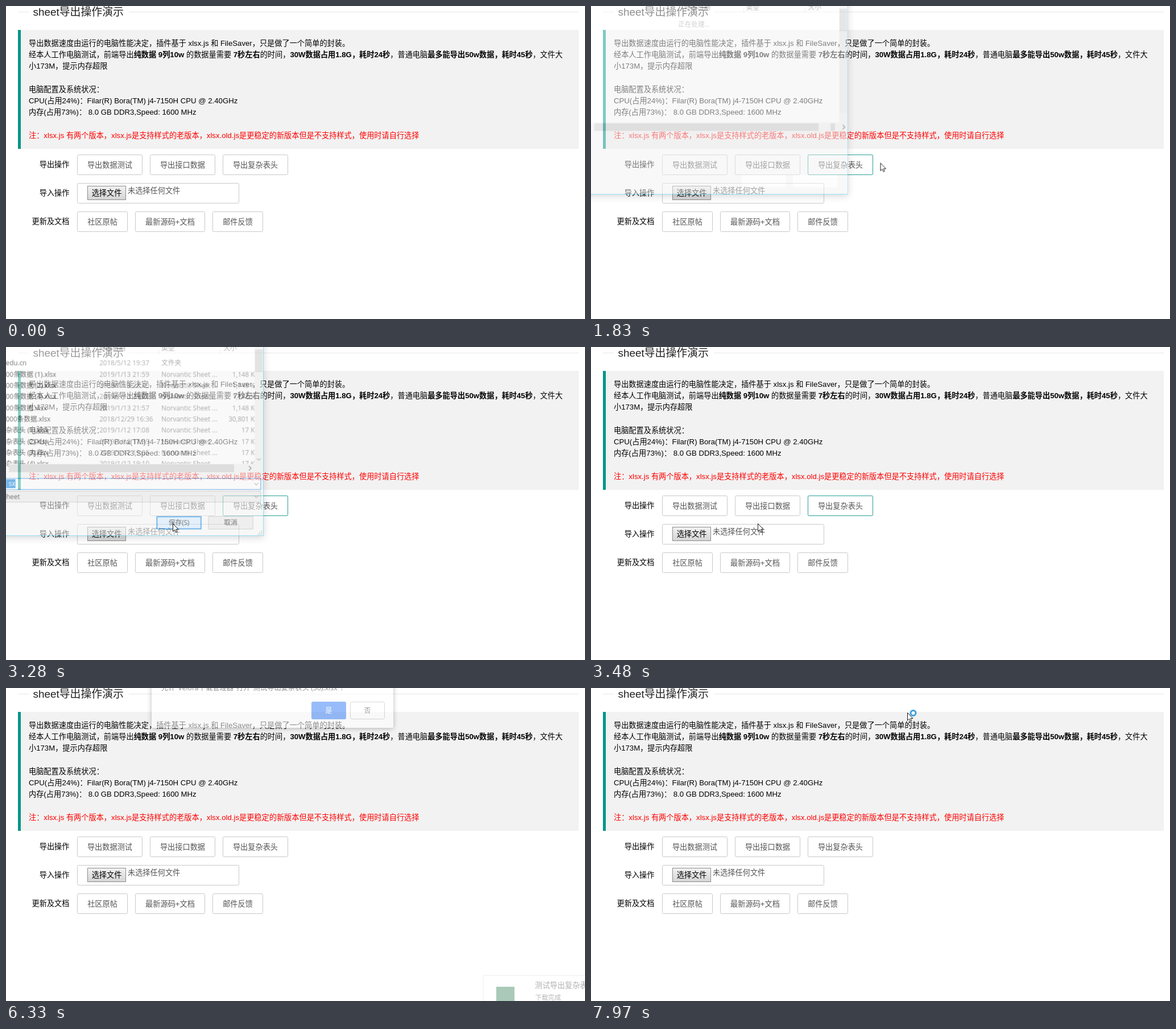
Animation, 1018 px wide and 550 px high, one loop 8000 ms. Source, as an HTML page:

```html
<!DOCTYPE html>
<html lang="zh-CN">
<head>
<meta charset="utf-8">
<title>导出操作演示</title>
<style>
html, body { margin: 0; width: 100%; height: 100%; overflow: hidden; background: #fff; }
svg { display: block; width: 1018px; height: 550px; }
text { white-space: pre; }
.page { font: 13.2px "Liberation Sans", "Noto Sans CJK SC", "Noto Sans CJK", sans-serif; }
.win { font: 12px "Open Sans", "Noto Sans CJK SC", "Noto Sans CJK", sans-serif; }
.b { font-weight: bold; }
.end { text-anchor: end; }
.mid { text-anchor: middle; }
#save { filter: drop-shadow(0 3px 7px rgba(0, 0, 0, .3)); }
#toast { filter: drop-shadow(0 0 2px rgba(0, 0, 0, .12)); }
#ask { filter: drop-shadow(0 1px 4px rgba(0, 0, 0, .5)); }
</style>
</head>
<body>
<svg id="stage" viewBox="0 0 1018 550" xmlns="http://www.w3.org/2000/svg"></svg>
<script>
const LOOP = 8000, TICK = 109;
const stage = document.getElementById('stage');

const text = (x, y, s, fill = '#000', cls = '', more = '') =>
  `<text x="${x}" y="${y}" fill="${fill}" class="${cls}" ${more}>${s}</text>`;
const bold = s => `<tspan class="b">${s}</tspan>`;
const box = (x, y, w, h, fill, stroke = 'none', more = '') =>
  `<rect x="${x}" y="${y}" width="${w}" height="${h}" fill="${fill}" stroke="${stroke}" ${more}/>`;
const line = (d, stroke, more = '') => `<path d="${d}" fill="none" stroke="${stroke}" ${more}/>`;

// A form row: right-aligned label, then buttons as wide as their text.
function formRow(label, labels, i) {
  const y = 261 + i * 50;
  let x = 125;
  const buttons = labels.map(s => {
    const w = Math.round([...s].reduce((sum, c) => sum + (c < '\x80' ? 7.7 : 13.2), 35.7));
    const left = x;
    x += w + 13;
    return box(left + .5, y + .5, w - 1, 35, '#fff', '#c9c9c9', 'rx="2"') +
      text(left + w / 2, y + 23, s, '#555', 'mid');
  });
  return text(111.5, y + 22.3, label, '#000', 'end') + buttons.join('');
}

function page() {
  const notes = [
    '导出数据速度由运行的电脑性能决定，插件基于 xlsx.js 和 FileSaver，只是做了一个简单的封装。',
    `经本人工作电脑测试，前端导出${bold('纯数据 9列10w')} 的数据量需要 ${bold('7秒左右')}的时间，${bold('30W数据占用1.8G，耗时24秒')}，普通电脑${bold('最多能导出50w数据，耗时45秒')}，文件大`,
    '小173M，提示内存超限',
    '',
    '电脑配置及系统状况：',
    'CPU(占用24%)：Filar(R) Bora(TM) j4-7150H CPU @ 2.40GHz',
    '内存(占用73%)： 8.0 GB DDR3,Speed: 1600 MHz',
    '',
    '注：xlsx.js 有两个版本，xlsx.js是支持样式的老版本，xlsx.old.js是更稳定的新版本但是不支持样式，使用时请自行选择'
  ];
  const form = [
    ['导出操作', ['导出数据测试', '导出接口数据', '导出复杂表头']],
    ['导入操作', []],
    ['更新及文档', ['社区原帖', '最新源码+文档', '邮件反馈']]
  ];
  return `<g class="page">
    ${line('M21 10.5H40M216 10.5H1007', '#e6e6e6')}
    ${text(207, 17, 'sheet导出操作演示', '#222', 'end', 'font-size="18.9"')}
    ${box(21, 42, 986, 209, '#f2f2f2')}${box(21, 42, 5, 209, '#009688')}
    ${notes.map((s, i) => text(40, 70 + i * 20.2, s, i === 8 ? '#f00' : '#000')).join('')}
    ${form.map(([label, labels], i) => formRow(label, labels, i)).join('')}
    <g id="hover">${box(381.5, 261.5, 114, 35, 'none', '#009688', 'rx="2"')}</g>
    ${box(125.5, 311.5, 284, 35, '#fff', '#c9c9c9', 'rx="2"')}
    ${box(143.5, 316.5, 67, 24, 'url(#grey)', '#8c8c8c')}
    ${text(177, 333, '选择文件', '#000', 'mid')}
    ${text(214, 329, '未选择任何文件', '#555')}
  </g>`;
}

function saveDialog() {
  const grey = '#6d6d6d';
  const rows = [
    ['edu.cn', '2018/5/12 19:37', ''],
    ['00条数据 (1).xlsx', '2019/1/13 21:59', '1,148 KB'],
    ['00条数据 (2).xlsx', '2019/1/13 22:10', '1,148 KB'],
    ['00条数据 (3).xlsx', '2019/1/13 23:03', '1,148 KB'],
    ['00条数据.xlsx', '2019/1/13 21:57', '1,148 KB'],
    ['000条数据.xlsx', '2018/12/29 16:36', '30,801 KB'],
    ['杂表头 (1).xlsx', '2019/1/12 17:08', '17 KB'],
    ['杂表头 (2).xlsx', '2019/1/12 17:39', '17 KB'],
    ['杂表头 (3).xlsx', '2019/1/12 19:05', '17 KB'],
    ['杂表头 (4).xlsx', '2019/1/12 19:10', '17 KB']
  ];
  const list = rows.map(([name, date, size], i) => {
    const y = 29.5 + i * 20.3;
    return text(-5.5, y, name) + text(164.5, y, date, grey) +
      text(277, y, size ? 'Norvantic Sheet ...' : '文件夹', grey) +
      text(454.5, y, size, grey, 'end');
  }).join('');
  const down = (x, y) => line(`M${x - 3.5} ${y}l3.5 3.5l3.5 -3.5`, '#444');
  const right = x => line(`M${x} 212l4 4l-4 4`, '#444', 'stroke-width="1.3"');
  let grip = '';
  for (let r = 0; r < 3; r++)
    for (let c = 2 - r; c < 3; c++) grip += box(452 + c * 3, 329 + r * 3, 2, 2, '#b5b5b5');

  return `<g id="save" class="win">
    ${box(-30, -30, 492.5, 368.5, '#f0f0f0', '#2cbdea')}
    ${box(-30, -30, 477, 238, '#fff')}
    ${line('M159.5 0V8M272.5 0V8M384.5 0V8', '#dcdcdc')}
    ${text(164, 2, '修改日期', grey)}${text(277, 2, '类型', grey)}${text(390, 2, '大小', grey)}
    <g id="busy">${text(153, 33, '正在处理...', '#999')}
      ${box(0, 209, 409, 14, '#cdcdcd')}${box(431, 209, 8, 14, '#cdcdcd')}${right(453)}
      ${box(447, 0, 14, 190, '#e8e8e8')}${box(447, 0, 14, 41, '#cdcdcd')}
      ${box(268, 303, 82, 23, '#fafafa')}${box(362, 303, 82, 23, '#fafafa')}</g>
    <g id="ready">${list}
      ${box(0, 208, 461, 15, '#f0f0f0')}${box(0, 209, 409, 14, '#cdcdcd')}${right(436)}
      ${box(447, 0, 14, 208, '#f0f0f0')}${box(447, 0, 14, 41, '#cdcdcd')}${down(454, 198)}
      ${box(-9.5, 234.5, 467, 20, '#fff', '#0078d7')}
      ${box(-5, 236, 17, 16, '#0078d7')}${text(11.5, 248.5, 'sx', '#fff', 'end')}${down(449.5, 243)}
      <g id="caret">${box(11, 236, 1, 16, '#000')}</g>
      ${box(-9.5, 257.5, 467, 20, '#e1e1e1', '#adadad')}
      ${text(20, 272, 'Sheet', '#000', 'end')}${down(449.5, 266)}
      ${box(269, 304, 80, 22, '#e1e1e1', '#0078d7', 'id="ok" stroke-width="2"')}
      ${text(309, 319, '保存(S)', '#000', 'mid')}
      ${box(362.5, 303.5, 81, 23, '#e1e1e1', '#adadad')}
      ${text(403, 319, '取消', '#000', 'mid')}
      ${grip}</g>
  </g>`;
}

const toast = () => `<g id="toast" class="page">
    ${box(839.5, 505.5, 200, 70, '#fff', '#dedede')}
    ${box(862, 525, 32, 32, '#207245')}
    ${text(930, 526.5, '测试导出复杂表头 (36).xlsx', '#333')}
    ${text(930.5, 547.5, '下载完成', '#444', '', 'font-size="11.3"')}
  </g>`;

const prompt = () => `<g id="ask" class="win">
    ${box(256, -20, 425, 90, '#fff', 'none', 'rx="2"')}
    ${text(273, 4, '允许"Velora下载管理器"打开"测试导出复杂表头 (36).xlsx"？', '#333', '', 'font-size="12.3"')}
    ${box(537, 24, 61, 31, '#4285f4', 'none', 'rx="3"')}
    ${text(567.5, 44, '是', '#fff', 'mid')}
    ${box(605.5, 24.5, 60, 30, '#fff', '#b8b8b8', 'rx="3"')}
    ${text(635.5, 44, '否', '#555', 'mid')}
  </g>`;

const cursor = () => `<g id="cursor">
    <path d="M.5 .5V14L3.6 11.2L5.7 15.8L7.8 14.9L5.8 10.4H10Z" fill="#fff" stroke="#111" stroke-width=".95"/>
    <g id="ring"><circle cx="10.5" cy="1" r="4.5" fill="#fff" stroke="#3f9fe0" stroke-width="3"/></g>
  </g>`;

stage.innerHTML = `<defs><linearGradient id="grey" x2="0" y2="1">
    <stop stop-color="#f2f2f2"/><stop offset="1" stop-color="#d4d4d4"/></linearGradient></defs>` +
  page() + saveDialog() + toast() + prompt() + cursor();

// Each step is [time in ms, value] and holds until the next one.
function play(id, steps, frame) {
  const keys = steps.map(([t, v]) => ({ offset: t / LOOP, easing: 'step-end', ...frame(v) }));
  keys.push({ ...keys[keys.length - 1], offset: 1 });
  document.getElementById(id).animate(keys, { duration: LOOP, iterations: Infinity });
}

// Samples f(0..1) once per screen tick between two times.
function sample(t0, t1, f) {
  const n = Math.round((t1 - t0) / TICK);
  return Array.from({ length: n + 1 }, (_, i) => [t0 + (t1 - t0) * i / n, f(i / n)]);
}
const ramp = (t0, t1, a, b) => sample(t0, t1, u => a + (b - a) * u);

// Curved pointer move that slows down towards its end.
function glide(t0, t1, from, to, via = from.map((v, i) => (v + to[i]) / 2)) {
  return sample(t0, t1, time => {
    const u = Math.sin(time * Math.PI / 2), w = 1 - u;
    return from.map((v, i) => w * w * v + 2 * w * u * via[i] + u * u * to[i]);
  });
}

const fade = opacity => ({ opacity });
const place = ([x, y]) => ({ transform: `translate(${x}px, ${y}px)` });
const grow = opacity => {
  const s = .928 + .072 * opacity;
  return { opacity, transform: `translate(${(1 - s) * 158}px, ${(1 - s) * 125}px) scale(${s})` };
};

const away = [-40, -40], start = [770, 485], exportBtn = [508.5, 275.5], aside = [565, 276],
  low = [256, 323], saveBtn = [293, 310], rest = [545, 245], note = [939, 520],
  nearYes = [584, 47], yes = [556, 43];

play('cursor', [[0, away],
  ...glide(100, 840, start, exportBtn, [610, 300]),
  ...glide(1840, 2060, exportBtn, aside),
  ...glide(2160, 2590, aside, low),
  ...glide(2600, 3050, low, saveBtn),
  ...glide(3700, 4350, saveBtn, rest, [380, 270]),
  ...glide(4351, 5240, rest, note, [764, 212]),
  [6330, away],
  ...glide(6440, 7100, note, nearYes, [900, 330]),
  [7210, [528, 36]], [7330, yes]], place);
play('ring', [[0, 0], [7760, 1]], fade);
play('hover', [[0, 0], ...ramp(740, 840, .4, .8), [1390, 1], [1500, .8], ...ramp(3810, 3920, .4, 0)], fade);
play('save', [[0, 0], ...ramp(1830, 2060, .5, 1), ...ramp(3260, 3480, .55, 0)], grow);
play('busy', [[0, 1], [2060, 0]], fade);
play('ready', [[0, 0], [2060, 1]], fade);
play('caret', [[0, 0], [2270, 1], [2590, 0]], fade);
play('ok', [[0, '#e1e1e1'], [2810, '#e5f1fb'], [3150, '#cce4f7']], fill => ({ fill }));
play('toast', [[0, 0], ...ramp(4130, 4350, .3, 1), ...ramp(6330, 6440, .38, 0)], fade);
play('ask', [[0, 0], ...ramp(6330, 6440, .55, 1), ...ramp(7650, 7970, .6, 0)], fade);
</script>
</body>
</html>
```
